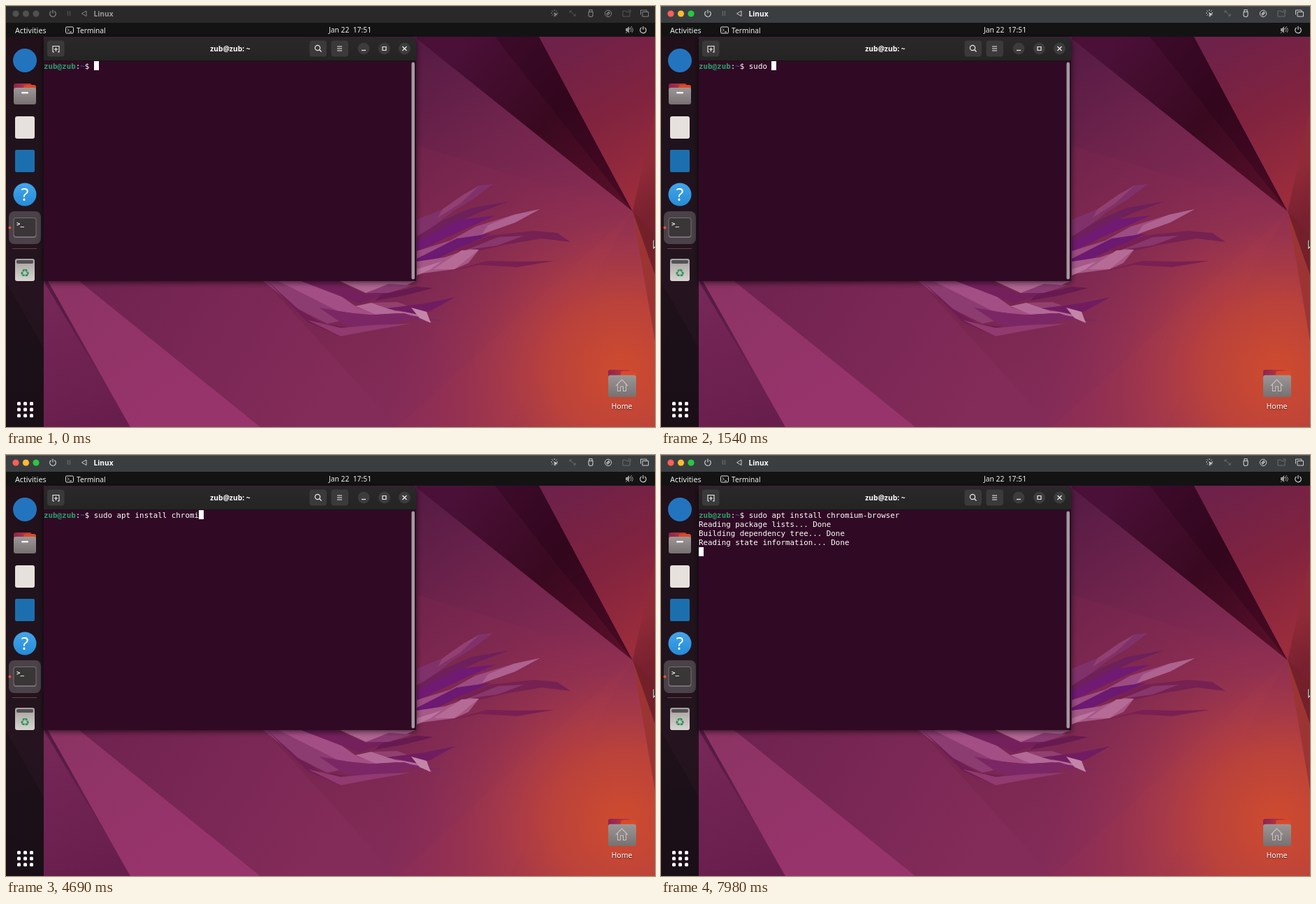
Recreate the animation shown at these times as an HTML page with a canvas. Size 929 by 603 pixels, loop 8000 ms.

```html
<!DOCTYPE html>
<html lang="en">
<head>
<meta charset="utf-8">
<title>Terminal</title>
<style>
html, body { margin: 0; width: 100%; height: 100%; overflow: hidden; background: #000; }
canvas { display: block; width: 929px; height: 603px; }
</style>
</head>
<body>
<canvas id="stage" width="929" height="603"></canvas>
<script>
const W = 929, H = 603, LOOP = 8000;
const SANS = '"Noto Sans", "Open Sans", sans-serif';
const MONO = '"DejaVu Sans Mono", monospace';
const CELL = 6.53, ROW = 13.1, LEFT = 54;
const USER = 'zub@zub';
const screen = document.getElementById('stage').getContext('2d');
const desktop = document.createElement('canvas');
desktop.width = W;
desktop.height = H;
let g = desktop.getContext('2d');

function gradient(x0, y0, x1, y1, ...colors) {
  const fill = g.createLinearGradient(x0, y0, x1, y1);
  colors.forEach((c, i) => fill.addColorStop(i / (colors.length - 1), c));
  return fill;
}
function rect(x, y, w, h, color) {
  g.fillStyle = color;
  g.fillRect(x, y, w, h);
}
function round(x, y, w, h, r, color) {
  g.fillStyle = color;
  g.beginPath();
  g.roundRect(x, y, w, h, r);
  g.fill();
}
function disc(x, y, r, color) {
  g.fillStyle = color;
  g.beginPath();
  g.arc(x, y, r, 0, 7);
  g.fill();
}
function poly(points, color) {
  g.fillStyle = color;
  g.fill(new Path2D('M' + points + 'Z'));
}
function stroke(path, color, width = 1) {
  g.strokeStyle = color;
  g.lineWidth = width;
  g.stroke(new Path2D(path));
}
function ring(x, y, r, color, from = 0, to = 2 * Math.PI, width = 1) {
  g.strokeStyle = color;
  g.lineWidth = width;
  g.beginPath();
  g.arc(x, y, r, from, to);
  g.stroke();
}
function label(text, x, y, font, color, align = 'left') {
  g.font = font;
  g.fillStyle = color;
  g.textAlign = align;
  g.fillText(text, x, y);
}
function power(x, y, color) {
  ring(x, y + .5, 4.3, color, -1, 4.14, 1.2);
  stroke(`M${x} ${y - 5}V${y}`, color, 1.2);
}

function drawWallpaper() {
  rect(0, 0, W, H, gradient(560, 80, 900, 560, '#561b45', '#76264e', '#832b58', '#8f2f55'));
  const glow = g.createRadialGradient(882, 525, 0, 882, 525, 340);
  glow.addColorStop(0, 'rgba(207,75,45,1)');
  glow.addColorStop(.3, 'rgba(200,72,52,.78)');
  glow.addColorStop(.62, 'rgba(180,62,66,.36)');
  glow.addColorStop(1, 'rgba(150,45,80,0)');
  rect(0, 0, W, H, glow);

  // facets meeting at the vertex on the right
  poly('897 294L588 345 588 200', 'rgba(150,45,85,.16)');
  poly('897 294L560 603 720 603', 'rgba(200,70,70,.06)');
  poly('897 294L588 47 588 44 763 44', gradient(640, 60, 890, 290, '#4b1038', '#390920', '#5b0f29'));
  poly('897 294L700 44 763 44', 'rgba(35,3,24,.32)');
  poly('897 294L763 44 929 44 929 190', gradient(800, 50, 915, 260, '#6e2149', '#80233f', '#9a2c3c'));
  poly('897 294L929 150 929 330', gradient(900, 240, 929, 300, '#8f2a38', '#78202f'));
  poly('897 294L929 326 929 405', '#74202b');
  poly('897 294L929 385 929 480', '#9c3434');

  // lower left
  poly('54 394L178 603 54 603', gradient(54, 400, 130, 600, '#772858', '#681e4c'));
  poly('60 394L105 394 364 603 178 603', gradient(100, 400, 230, 603, '#8d3364', '#98346c'));
  poly('105 394L370 394 560 603 364 603', gradient(120, 400, 430, 600, '#702350', '#832b59'));

  // tentacles beside the window
  poly('588 306L625 291 655 270 678 257 697 255 668 277 640 294 588 333', '#81316a');
  poly('625 291L655 270 678 257 650 283 618 303', '#934071');
  poly('588 330L628 306 667 289 720 280 674 297 638 314 588 342', '#6d205b');
  poly('588 338L650 306 701 300 665 316 630 332 588 352', '#701a73');
  poly('588 351L636 336 672 316 727 299 764 291 729 310 690 324 648 340 588 370', '#9d4b83');
  poly('690 314L727 299 764 291 729 310 681 327', '#ae628f');
  poly('588 362L645 333 695 326 662 341 625 358 588 375', '#6c1972');
  poly('640 349L692 329 755 322 789 325 808 338 767 333 714 342 663 354', '#762152');
  poly('660 349L704 331 741 329 704 343', '#88366b');
  poly('588 366L628 360 663 348 677 349 662 368 642 377 588 384', '#a65888');
  poly('612 377L652 350 677 349 642 377', '#b66b96');
  poly('626 382L689 365 736 366 785 365 732 374 677 371', '#7a1f53');
  poly('588 377L623 366 608 377 588 386', '#bb749e');

  // tentacles below the window
  poly('368 394L400 394 451 421 502 446 460 455 418 434', '#8d3c71');
  poly('374 394L418 434 453 455 499 461 479 473 432 453', '#701d53');
  poly('390 394L449 394 503 432 541 444 477 438', '#a44e86');
  poly('422 394L473 394 516 413 560 408 506 426', '#73205c');
  poly('478 394L586 394 548 411 515 411', '#b06592');
  poly('515 411L548 398 582 400 548 411', '#8a3a72');
  poly('500 430L523 425 558 437 587 432 609 453 570 440 530 442', '#b36998');
  poly('523 425L560 424 604 440 558 437', '#92406f');
  poly('448 432L513 443 560 440 628 451 576 449 531 464 482 455', '#7c2765');
  poly('432 450L479 461 526 457 580 455 527 464 479 473', '#913a70');
  poly('538 413L588 402 612 404 569 415 528 422', '#671a50');
  poly('545 433L600 426 643 417 607 437 590 442', '#711c61');
  poly('580 432L602 438 608 454 592 447', '#c486a8');
}

function drawFolder(x, y, w, h) {
  round(x, y, w * .8, h * .8, 3, gradient(x, y, x + w, y, '#8f2350', '#d1452f'));
  round(x + w * .45, y + 2, w * .55, h * .6, 3, '#d94a2a');
  round(x, y + h * .2, w, h * .8, 3, gradient(x, y, x, y + h, '#a59f9f', '#777171'));
}

function drawDock() {
  rect(0, 44, 54, H - 44, gradient(0, 44, 54, H, '#211019', '#20131d', '#25141f', '#1d1019'));
  poly('0 395L54 490 54 603 0 603', 'rgba(20,14,18,.4)');
  disc(27, 78, 17, '#2374bf');
  drawFolder(11, 111, 32, 30);
  round(22, 123, 10, 2.5, 1, '#f4f1f1');
  round(13, 158, 28, 32, 3, '#e6e1dc');
  round(13, 206, 28, 32, 2, '#1c6fae');
  disc(27, 270, 16.5, gradient(27, 253, 27, 287, '#43a5ed', '#268bd5'));
  label('?', 27, 279, `500 25px ${SANS}`, '#fff', 'center');
  round(4, 294, 46, 47, 8, '#4b4148');
  round(10.5, 303, 33, 29, 4, '#766f73');
  round(11.5, 304, 31, 26, 3, '#3a3638');
  label('>_', 15, 315, `bold 9px ${MONO}`, '#fff');
  disc(5.5, 317.5, 2, '#e9542f');
  rect(9, 347, 35, 1, '#66403f');
  round(13, 362, 28, 32, 3, gradient(13, 362, 13, 394, '#a5a19f', '#d8d5d1'));
  round(15, 364, 24, 5, 2, '#555152');
  label('♻', 27, 388, '16px "DejaVu Sans", sans-serif', '#2e935b', 'center');
  for (let i = 0; i < 9; i++)
    round(16 + i % 3 * 9, 567 + Math.floor(i / 3) * 8.6, 5, 5, 1.5, '#fff');
}

function drawTopPanel() {
  rect(0, 24, W, 20, '#131313');
  label('Activities', 13, 38.5, `500 10.7px ${SANS}`, '#eee');
  g.strokeStyle = '#ddd';
  g.lineWidth = 1;
  g.beginPath();
  g.roundRect(85.5, 30, 11, 9, 1.5);
  g.stroke();
  stroke('M88 32.5L90 34.5 88 36.5M91 37H94', '#ddd');
  label('Terminal', 101, 38.5, `500 10.2px ${SANS}`, '#eee');
  label('Jan 22\u00a0 17:51', 492.5, 38, `500 10.3px ${SANS}`, '#eee', 'center');
  poly('887 32H889L892 29V39L889 36H887', '#999');
  stroke('M887 39L896 29M894 32Q896 34 894 37M896 31Q899 34 896 38', '#999');
  power(912, 34, '#ccc');
}

function drawWindow() {
  g.save();
  g.shadowColor = 'rgba(0,0,0,.65)';
  g.shadowBlur = 9;
  g.shadowOffsetY = 2;
  round(54, 45, 533, 349, [7, 7, 0, 0], '#300a24');
  g.restore();
  round(54, 45, 533, 34, [7, 7, 0, 0], gradient(0, 45, 0, 79, '#292929', '#242424'));
  rect(54, 78, 533, 1, '#171317');
  label(`${USER}: ~`, 321, 65, `bold 10.3px ${SANS}`, '#fff', 'center');
  for (const x of [59, 434.5, 465.5]) round(x, 49.5, 24.5, 23, 4, '#3a3a3a');
  stroke('M67 66V57.5H76V66H74M67 66H69M71.5 59.5V65M69 62H74', '#eee', 1.1);
  ring(446, 60, 3.6, '#eee', 0, 7, 1.2);
  stroke('M448.7 62.7L451.5 65.5', '#eee', 1.3);
  stroke('M474 58H481M474 61H481M474 64H481', '#eee', 1.2);
  for (const x of [512, 541.5, 570.5]) disc(x, 61, 8.4, '#3c3c3c');
  stroke('M509 63.5H515', '#eee', 1.2);
  stroke('M539 58.5H544V63.5H539Z', '#eee', 1.2);
  stroke('M567.5 58L573.5 64M573.5 58L567.5 64', '#eee', 1.3);
  round(580.5, 80.5, 4.5, 311, 2.2, '#a39a9f');
}

function drawHome() {
  drawFolder(862, 521, 40, 39);
  stroke('M873 544L881.5 535 890 544M875.5 542V551.5H879.5V545H883.5V551.5H887.5V542', '#c9c1be', 1.1);
  g.save();
  g.shadowColor = 'rgba(0,0,0,.6)';
  g.shadowBlur = 2;
  g.shadowOffsetY = 1;
  label('Home', 881.5, 576.5, `500 10.6px ${SANS}`, '#fff', 'center');
  g.restore();
}

function drawPointer() {
  poly('927 335L935 343 931 343 932 347 930 347 927 347', '#17080f');
  stroke('M927 335.5V347L930 344', '#eee', 1.1);
}

function drawHostBar(active) {
  const ink = active ? '#c9cacb' : '#858585';
  const dim = active ? '#6a6d6f' : '#555';
  rect(0, 0, W, 24, active ? '#3b3e41' : '#292929');
  rect(0, 0, W, 1, active ? '#56595b' : '#3b3b3b');
  const lights = active ? ['#fe5f57', '#febc2e', '#28c840'] : Array(3).fill('#505050');
  lights.forEach((c, i) => disc(14 + i * 14.5, 11, 4.6, c));
  power(67, 10.5, ink);
  stroke('M88.5 7V14M91.5 7V14', dim, 1.2);
  stroke('M115 7V14.5L108.5 10.8Z', ink);
  label('Linux', 125.5, 14.8, `bold 10.2px ${SANS}`, active ? '#fff' : '#999');

  for (let i = 0; i < 8; i++) {
    const dx = Math.cos(i * Math.PI / 4), dy = Math.sin(i * Math.PI / 4);
    stroke(`M${785 + dx * 3} ${10 + dy * 3}L${785 + dx * 5} ${10 + dy * 5}`, ink);
  }
  poly('784 9L790 12 787 13 786 16', ink);
  stroke('M807 10V7H810M807 7L815 14M815 11V14H812', dim);
  stroke('M834 8.5H840V13Q840 15.5 837 15.5Q834 15.5 834 13ZM835 8V5.5H839V8', ink, 1.1);
  ring(862, 10.8, 4.7, ink);
  stroke('M859.5 12L863.5 8M860.5 13.5L864.5 9.5', ink, 1.2);
  stroke('M883 7H887L888 8.5H893V15H883ZM890 6H894V9', dim);
  stroke('M908.5 12.5V6H917V8M911 8.5H919.5V15H911Z', ink);
}

const COMMAND = 'sudo apt install chromium-browser';
const KEYS = [
  1120, 1190, 1330, 1400, 1540,
  2100, 2170, 2310, 2380,
  2520, 2590, 2730, 2870, 3010, 3150, 3290, 3430,
  3570, 3710, 3850, 4060, 4270, 4550, 4830, 5110,
  6300, 6580, 6650, 6790, 6930, 7140, 7350, 7490
];
const ENTER = 7560, BLINK = 490;
const OUTPUT = [
  [7630, 'Reading package lists... Done\n'],
  [7630, 'Building dependency tree... '],
  [7700, 'Done\n'],
  [7840, 'Reading state information... '],
  [7980, 'Done\n']
];

function drawShell(t) {
  const cell = (text, col, row, color, weight = '') =>
    label(text, LEFT + col * CELL, 90 + row * ROW, `${weight} 10.85px ${MONO}`, color);
  const typed = KEYS.filter(k => k <= t);
  cell(USER, 0, 0, '#26a269', 'bold');
  cell(':', 7, 0, '#fff');
  cell('~', 8, 0, '#2a569b', 'bold');
  cell('$', 9, 0, '#fff');
  cell(COMMAND.slice(0, typed.length), 11, 0, '#fff');

  let col = 11 + typed.length, row = 0, visible = true;
  if (t >= ENTER) {
    const lines = OUTPUT.filter(o => o[0] <= t).map(o => o[1]).join('').split('\n');
    lines.forEach((line, i) => cell(line, 0, i + 1, '#fff'));
    row = lines.length;
    col = lines[row - 1].length;
  } else {
    const last = typed.length ? typed[typed.length - 1] : -210;
    visible = Math.floor((t - last) / BLINK) % 2 === 0;
  }
  if (visible) rect(Math.round(LEFT + col * CELL), Math.round(79.4 + row * ROW), 7, 13, '#fff');
}

drawWallpaper();
drawDock();
drawTopPanel();
drawWindow();
drawHome();
drawPointer();
g = screen;

function frame() {
  const t = performance.now() % LOOP;
  g.drawImage(desktop, 0, 0);
  drawHostBar(t >= 70);
  drawShell(t);
  requestAnimationFrame(frame);
}
frame();
</script>
</body>
</html>
```
